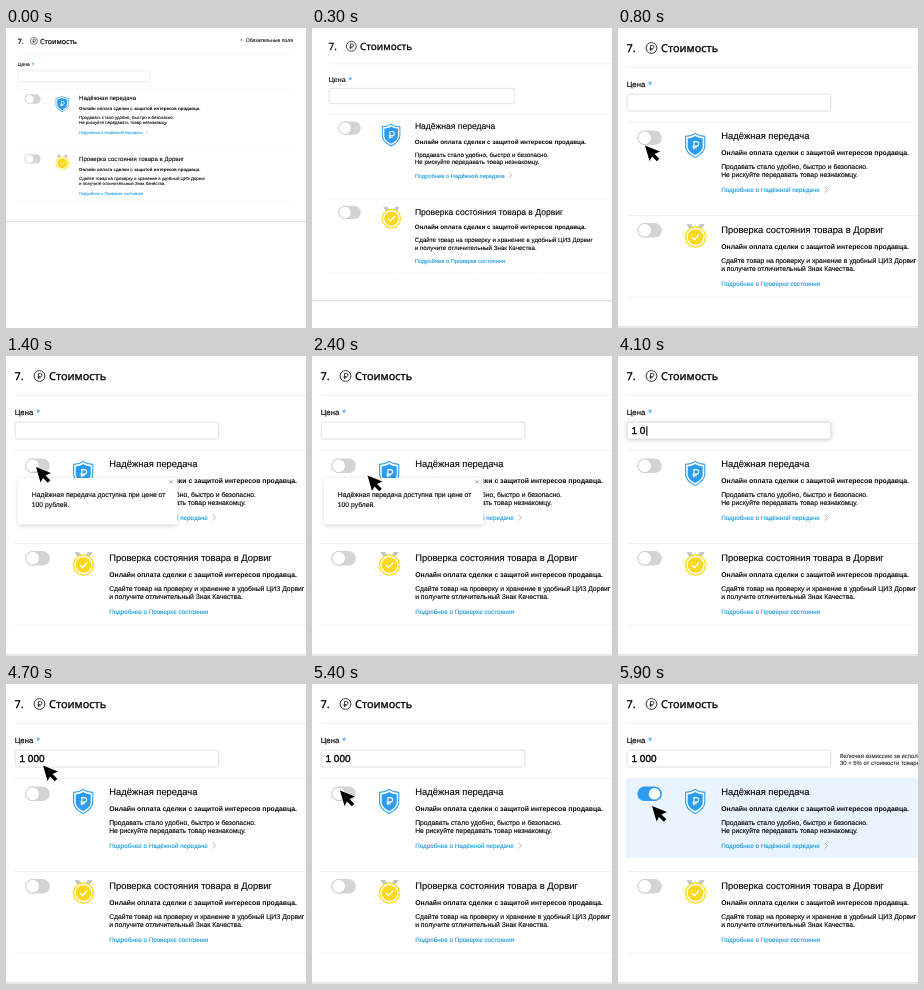
An HTML page for the animation above (8000 ms loop, 300 px wide and 300 px high).

```html
<!DOCTYPE html>
<html lang="ru">
<head>
<meta charset="utf-8">
<style>
  html, body { margin: 0; width: 100%; height: 100%; overflow: hidden; background: #fff; }
  svg { display: block; width: 100%; height: 100%; }
  text { font-family: "Liberation Sans", Arial, sans-serif; color: #000; fill: currentColor; stroke: currentColor; stroke-width: .12px; text-rendering: geometricPrecision; white-space: pre; }
  .head { font: 500 10.9px "Noto Sans", "Open Sans", sans-serif; stroke-width: .3px; }
  .title { font-size: 9.4px; }
  .bold { font-size: 6.85px; font-weight: 700; stroke-width: 0; }
  .body { font-size: 6.8px; }
  .link { font-size: 6.28px; color: #1a9be0; }
  .label { font-size: 7.7px; }
  .note { font-size: 5.9px; color: #333; }
  .value { font-size: 10px; stroke-width: .35px; }
  .star { font-size: 9.5px; color: #2b9cf0; }
  .rule { stroke: #f0f0f0; stroke-width: .9; }
  .dotted { stroke: #e2e2e2; stroke-width: .8; stroke-dasharray: 1 1; }
</style>
</head>
<body>
<svg viewBox="0 0 300 300">
  <defs>
    <filter id="soft" x="-20%" y="-60%" width="140%" height="240%"><feGaussianBlur stdDeviation="2.5"/></filter>
    <path id="ruble" d="M-1.7 4V-3.6H.8a2.2 2.2 0 0 1 0 4.5H-3M-3 2.5H1.2" fill="none"/>
    <linearGradient id="edge" x2="0" y2="1"><stop stop-color="#d4d4d4"/><stop offset="1" stop-color="#fff"/></linearGradient>
  </defs>
  <g id="page">
    <rect x="-20" y="298.3" width="520" height="2.4" fill="url(#edge)"/>
    <text class="head" x="8.5" y="24.3">7.</text>
    <circle cx="33.5" cy="20" r="5.4" fill="none" stroke="#222" stroke-width=".9"/>
    <use href="#ruble" transform="translate(33.8 20) scale(.72)" stroke="#222" stroke-width="1.2"/>
    <text class="head" x="43" y="24.3">Стоимость</text>
    <text class="star" x="352" y="22.6">*</text>
    <text x="361" y="21.6" font-size="7.9">Обязательные поля</text>
    <path class="rule" d="M9 39.3H435"/>
    <text class="label" x="8.7" y="59.3">Цена</text>
    <text class="star" x="30.3" y="60.3">*</text>
    <rect id="glow" x="9" y="66.5" width="204" height="17.5" rx="2" fill="#777" filter="url(#soft)"/>
    <rect x="9.2" y="66.2" width="203.6" height="16.8" rx="1.5" fill="#fff" stroke="#dedede" stroke-width=".9"/>
    <text class="value" id="value" x="13.5" y="78.3"></text>
    <path id="caret" d="M0 70.3V79.7" stroke="#000" stroke-width="1.1"/>
    <g id="fee">
      <text class="note" x="222" y="74">Включая комиссию за использование сервиса</text>
      <text class="note" x="222" y="81">30 + 5% от стоимости товара</text>
    </g>
    <path class="dotted" d="M9 94.3H435M9 187.5H435M9 269H435"/>
    <rect id="row" x="8" y="94" width="427" height="80" fill="#e9f4fe"/>

    <g id="switches"></g>

    <g id="shield" transform="translate(77.2 117.2)" fill="#2b9cf0">
      <path id="crest" d="M0-11.8C2.8-9.7 5.8-8.9 9.6-8.8V.8C9.6 6.6 5 9.8 0 12.2C-5 9.8-9.6 6.6-9.6 .8V-8.8C-5.8-8.9-2.8-9.7 0-11.8Z" fill="#fff" stroke="#2b9cf0" stroke-width="1.1" stroke-linejoin="round"/>
      <use href="#crest" style="display:none"/>
      <path d="M0-9.3C2.4-7.7 4.6-7 7.5-6.9V.8C7.5 5.2 4 7.8 0 9.8C-4 7.8-7.5 5.2-7.5 .8V-6.9C-4.6-7-2.4-7.7 0-9.3Z"/>
      <use href="#ruble" transform="translate(.4 0)" stroke="#fff" stroke-width="1.1"/>
    </g>
    <g transform="translate(77.5 209)">
      <path d="M-9-13H-4.5L-1-8L-5-6ZM9-13H4.5L1-8L5-6Z" fill="#c6c6c6"/>
      <path id="medal" fill="#fff" stroke="#fbd81c" stroke-width="1.3"/>
      <circle r="7.8" fill="#fbd81c"/>
      <path d="M-3.6 .1L-1 2.7L3.8-2.5" fill="none" stroke="#fff" stroke-width="1.4"/>
    </g>

    <text class="title" x="103.3" y="111.3">Надёжная передача</text>
    <text class="bold" x="103.2" y="127.4">Онлайн оплата сделки с защитой интересов продавца.</text>
    <text class="body" x="103.2" y="141">Продавать стало удобно, быстро и безопасно.</text>
    <text class="body" x="103.2" y="149">Не рискуйте передавать товар незнакомцу.</text>
    <text class="link" x="103.2" y="164">Подробнее о Надёжной передаче</text>
    <path d="M206.8 158.8L209.5 161.6L206.8 164.4" fill="none" stroke="#8aa0ac" stroke-width=".8"/>

    <text class="title" x="103.3" y="205.2">Проверка состояния товара в Дорвиг</text>
    <text class="bold" x="103.2" y="220.5">Онлайн оплата сделки с защитой интересов продавца.</text>
    <text class="body" x="103.2" y="234.5">Сдайте товар на проверку и хранение в удобный ЦИЗ Дорвиг</text>
    <text class="body" x="103.2" y="243.3">и получите отличительный Знак Качества.</text>
    <text class="link" x="103.2" y="258">Подробнее о Проверке состояния</text>
  </g>

  <g id="popup">
    <rect x="13" y="123.5" width="158" height="46" fill="#000" opacity=".2" filter="url(#soft)"/>
    <rect x="12" y="122" width="159.5" height="46.5" rx="1" fill="#fff"/>
    <path d="M163.2 124L166.8 127.6M166.8 124L163.2 127.6" stroke="#888" stroke-width=".7"/>
    <text class="body" x="25.8" y="140.8">Надёжная передача доступна при цене от</text>
    <text class="body" x="25.8" y="150.8">100 рублей.</text>
  </g>
  <path id="cursor" d="M0 0L15 6L9.5 8.5L14.3 13.3L11.8 15.8L7 11L4.5 15.5Z" fill="#000" stroke="#fff" stroke-width=".6" paint-order="stroke"/>
</svg>
<script>
const LOOP = 8000, STEP = 100;
const $ = id => document.getElementById(id);
const set = (el, name, v) => el.setAttribute(name, v);
const ramp = (t, a, b) => Math.min(1, Math.max(0, (t - a) / (b - a)));
const ease = p => p * p * (3 - 2 * p);
const mix = (a, b, p) => a + (b - a) * p;

// Cursor visits: each a list of [time, x, y], shown from first to end.
const visits = [
  { end: 3800, keys: [[600, 8, 142], [700, 18, 128], [800, 27, 117.5], [900, 30, 111], [2300, 30, 111],
    [2400, 55.5, 119.5], [2600, 148, 126], [2700, 163, 126], [3000, 163, 126], [3200, 148, 109],
    [3500, 125, 74]] },
  { end: LOOP, keys: [[4600, 39, 77], [4800, 35, 86], [5000, 30, 99], [5200, 28, 106.5],
    [5500, 28, 106.5], [5900, 34, 122]] }
];

function cursorAt(t) {
  const visit = visits.find(v => t >= v.keys[0][0] && t < v.end);
  if (!visit) return null;
  const { keys } = visit;
  const i = keys.findIndex(k => k[0] > t);
  if (i < 0) return keys.at(-1).slice(1);
  const [a, b] = [keys[i - 1], keys[i]], p = ramp(t, a[0], b[0]);
  return [mix(a[1], b[1], p), mix(a[2], b[2], p)];
}

const switchMarkup = (y, id) => `<g transform="translate(19.3 ${y})">
  <rect id="track${id}" width="24.6" height="14.6" rx="7.3" fill="#d4d4d4"/>
  <circle id="knob${id}" cx="7.4" cy="7.3" r="6.8" fill="#fff" stroke="#c2c2c2" stroke-width=".7"/></g>`;
$('switches').innerHTML = switchMarkup(102.5, 1) + switchMarkup(195, 2);

const rim = Array.from({ length: 72 }, (_, i) => {
  const a = i * Math.PI / 36, r = 9.9 + .4 * Math.cos(12 * a);
  return `${(r * Math.cos(a)).toFixed(2)} ${(r * Math.sin(a)).toFixed(2)}`;
});
set($('medal'), 'd', `M${rim.join('L')}Z`);

const entries = ['', '1', '1 0', '1 00', '1 000'];
const digitWidth = 5.56, spaceWidth = 2.78;

function draw(t) {
  const zoom = mix(.647, 1, ramp(t, 0, 400));
  set($('page'), 'transform', `scale(${zoom}) translate(${t < 400 ? 9.6 : 0} 0)`);

  set($('popup'), 'opacity', ramp(t, 900, 1400) * (1 - ramp(t, 2800, 3200)));
  set($('glow'), 'opacity', t < 4400 ? .35 * ramp(t, 3500, 3900) : 0);

  const typed = Math.max(0, Math.min(4, Math.floor((t - 3900) / 100)));
  $('value').textContent = entries[typed];
  const caretX = 15 + typed * digitWidth + (typed > 1 ? spaceWidth : 0);
  set($('caret'), 'transform', `translate(${caretX} 0)`);
  set($('caret'), 'opacity', t >= 3800 && t < 4400 ? 1 : 0);

  const on = ease(ramp(t, 5400, 5800));
  set($('row'), 'opacity', on);
  set($('fee'), 'opacity', on);
  set($('knob1'), 'cx', mix(7.4, 17.2, on));
  set($('knob1'), 'r', mix(6.8, 5.8, on));
  set($('knob1'), 'stroke-opacity', 1 - on);
  const channel = (a, b) => Math.round(mix(a, b, on));
  set($('track1'), 'fill', `rgb(${channel(212, 43)},${channel(212, 156)},${channel(212, 240)})`);

  const pos = cursorAt(t);
  set($('cursor'), 'opacity', pos ? 1 : 0);
  if (pos) set($('cursor'), 'transform', `translate(${pos[0]} ${pos[1]})`);
}

const start = performance.now();
function tick() {
  const t = (performance.now() - start) % LOOP;
  draw(Math.floor(t / STEP) * STEP);
  requestAnimationFrame(tick);
}
tick();
</script>
</body>
</html>
```
